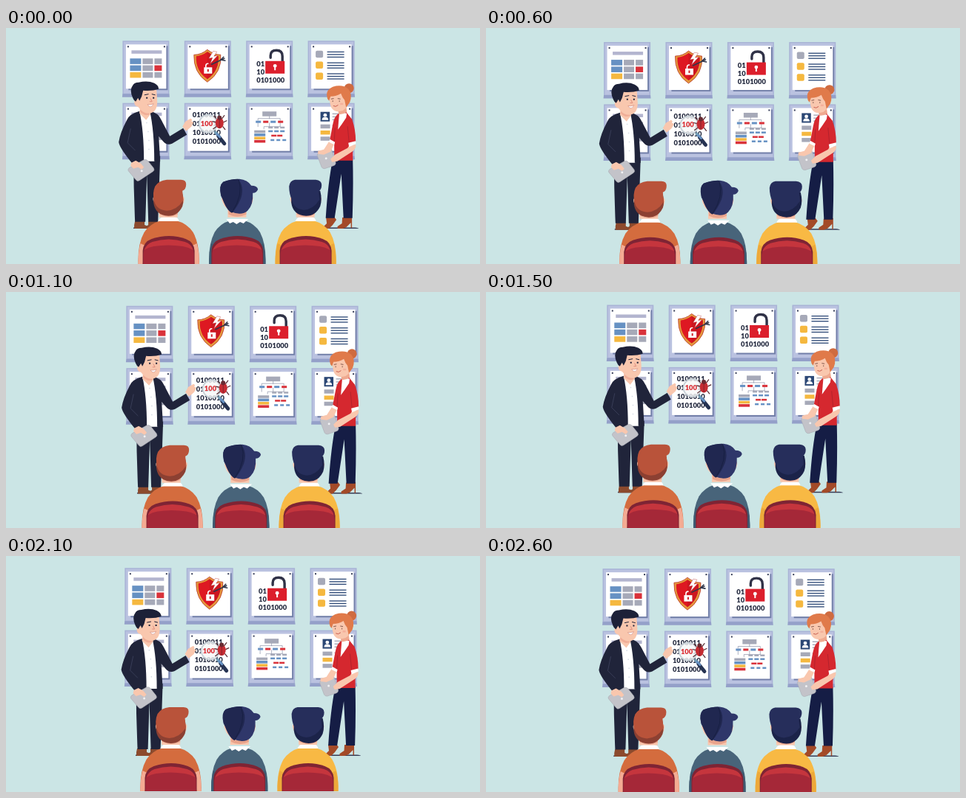
An HTML page for the animation above (2650 ms loop, 640 by 320 pixels).

```html
<!DOCTYPE html>
<html lang="en">
<head>
<meta charset="utf-8">
<title>Security training</title>
<style>
  html, body { margin: 0; width: 100%; height: 100%; overflow: hidden; background: #cbe5e5; }
  svg { display: block; width: 100%; height: 100%; }
  text { font: 900 9.4px Lato, "Open Sans", sans-serif; fill: #252b40; }
  .skin { fill: #f9c7ae; }
  .ink { fill: #20243a; }
  .line { fill: none; stroke-linecap: round; stroke-linejoin: round; }
</style>
</head>
<body>
<svg viewBox="0 0 640 320">
  <g class="base" id="boards"></g>

  <g class="base">
    <path fill="#343a55" d="M172 270.500H216q6 .5 6 1.500H172zM428 270.500H471q5 .5 5 1.500H428z"/>
    <path fill="#8c4a2d" d="M174 262h13v5l5 2v3h-19v-5zM192 262h12v5l4 2v3h-19v-3l3-2z"/>
    <path fill="#a34a28" d="M432 257l11-1 3 4-5 7-5 5h-7v-3l4-4zM454 257l13-1v15h-1.500v-7l-6 6-5 2h-7v-3l6-4z"/>
  </g>

  <!-- presenter, left -->
  <g class="top">
    <path class="ink" d="M172 174h36l-3 89h-13l-2-64-2 64h-14q-2-45-2-89z"/>
    <path fill="#fff" d="M179 112h16q5 30 6 69h-16z"/>
    <path class="ink" d="M180 113Q166 117 163 125Q154 142 152 155Q153 163 172 186L179 181L171 165L172 181H186Q186 140 180 113zM194 113Q205 115 209 124L221 147L239 136L244 145L224 157Q217 160 212 154L206 147L208 181H200Q200 140 194 113z"/>
    <path class="line" stroke="#383d57" d="M168 137l-4 19 10 10"/>
    <path fill="#d5dce6" d="M189 128h1.500v1.500H189zM191 140h1.500v1.500H191zM192 152h1.500v1.500H192zM192 164h1.500v1.500H192z"/>
    <path class="skin" d="M181 107l13 3 1 7-6 8-9-9zM238 134l4-7 7-4q3 1 1 4l3 1-3 6-7 6z"/>
    <path fill="#f0ae98" d="M181 109q7 7 13 5v3q-6 4-13-3z"/>
    <path class="skin" d="M178 84h25l1 16q0 14-10 16-9 1-16-9-5-1-5-6 0-5 5-5z"/>
    <path fill="#1d2138" d="M171 95q-5-11 0-17 2-4 8-4 12-3 21 1 6 3 6 8-9 3-21 2l-2 8-3 6-2-4-3 5q-3-2-4-5z"/>
    <path class="line" stroke="#1d2138" d="M187 91l5-1M197 90l4 1"/>
    <path fill="#1d2138" d="M189 94h2v2h-2zM198 94h2v2h-2z"/>
    <path class="line" stroke="#df8f7e" d="M195 96l2 4h-3"/>
    <path fill="#fff" stroke="#c4746a" stroke-width=".5" d="M191 104q4 1 8-1-2 5-5 4-2-1-3-3z"/>
    <path fill="#c3c3c9" stroke="#a8a9b2" stroke-width=".6" d="M166 190l20-11q3-1 5 1l8 10q2 3-1 5l-18 12q-3 2-5-1l-10-12q-1-2 1-4z"/>
    <circle cx="183" cy="194" r="1.500" fill="#f1f1f3"/>
    <path class="skin" d="M169 183l6-3 7 4 4 5-3 3-5-3-6 2-4-4z"/>
  </g>

  <!-- presenter, right -->
  <g class="top">
    <path fill="#151d45" d="M441 178h27q1 40-.5 80h-12l-3-60-9 60h-12q3-48 9.500-80z"/>
    <path class="skin" d="M449 106h10l1 11-7 10-4-10z"/>
    <path fill="#d5282f" d="M449 116Q443 120 441 131L437 152L443 156L443 180H468V160L472 154Q472 138 467 124Q462 118 459 114z"/>
    <path class="line" stroke="#b3222c" d="M461 134l2 21M444 136l-1 18"/>
    <path fill="#fff" d="M450 114l10 2-1 6-6 9-5 7 1-13z"/>
    <path fill="#efa98f" d="M448 111q6 1 11-4l1 7q-5 4-11 3z"/>
    <path class="skin" d="M437 89l22-3 2 15q-1 11-10 12-8 2-12-5-3-7-2-19z"/>
    <circle cx="463" cy="82" r="6.500" fill="#cf6b40"/>
    <path fill="#e07a4a" d="M433 92q-1-8 8-12 13-4 21 3 6 7 2 18l-5 7-2-10q-3-3-5-9-6 4-14 4l-2 6q-3-3-3-7z"/>
    <path class="line" stroke="#643b34" stroke-width=".8" d="M439 96.500l3-.5M448 96l3 .5M441 99v1M450 99v1"/>
    <path class="line" stroke="#c85e51" d="M442 106q3 2 6-1"/>
    <path fill="#f4b09b" d="M451 102h4v2.500h-4z"/>
    <path fill="#c3c3c9" stroke="#a8a9b2" stroke-width=".6" d="M422 169l13-6q3-1 4 1l6 19q0 3-3 4l-12 4q-3 0-4-2l-6-16q0-2 2-4z"/>
    <circle cx="432" cy="177" r="1.500" fill="#f1f1f3"/>
    <path class="skin" d="M436 154l7 3-5 11-9 4-8-1v-4l8-2zM463 160l9-2q1 6-5 10l-20 13-7 1-2-4 6-6 17-9z"/>
    <path fill="#fff" d="M437 151l7 4-1 3.500-7-3.500zM462 156l10-2.500v4l-9 4z"/>
  </g>

  <!-- audience -->
  <g class="base" id="bodies"></g>
  <g class="top">
    <g id="necks"></g>
    <path fill="#8c4032" d="M199 225l38-4q4 12 1 21-6 13-19 13-18-1-20-18z"/>
    <path fill="#b9533a" d="M200 235q-3-11 1-20 5-8 16-9h19q7 0 7 6 0 7-5 9l1 13q-8 13-22 14-14-1-17-13z"/>
    <path fill="#2f376a" d="M290 228q-3-14 3-19 10-4 22-4 11 1 16 9 8 0 9 5-2 5-7 5 1 16-7 24-4 4-11 4-12-1-15-7z"/>
    <path fill="#202750" d="M290 226q-3-12 3-17 10-4 20-4 9 10 4 26-5 12-12 20-8-3-15-25z"/>
    <path class="line" stroke="#171f43" d="M314 206q7 20-9 44"/>
    <path fill="#1b2349" d="M385 225l39-4q3 12 0 21-6 13-19 13-18-1-20-18z"/>
    <path fill="#262e5b" d="M386 234q-4-9-4-19 1-8 8-9h28q8 1 8 7 0 6-4 9l1 11q-8 13-21 14-13-1-16-13z"/>
  </g>
  <g class="base" id="seats"></g>
</svg>

<script>
const LOOP = 2650, STEP = 50, TAU = 2 * Math.PI;
const id = name => document.getElementById(name);
const rect = (x, y, w, h, fill) => `<rect x="${x}" y="${y}" width="${w}" height="${h}" fill="${fill}"/>`;
const path = (d, fill, more = '') => `<path d="${d}" fill="${fill}" ${more}/>`;
const stroke = (d, color, w) => path(d, 'none', `stroke="${color}" stroke-width="${w}" stroke-linecap="round"`);
const label = (x, y, s) => `<text x="${x}" y="${y}">${s}</text>`;

const BLUE = '#6691c3', GREY = '#a6a9b8', GOLD = '#f5b83f', RED = '#d9323a', NAVY = '#2b4775';

// Poster artwork; the origin is the top left corner of its board.
function calendar() {
  const fills = [BLUE, GREY, GREY, BLUE, GREY, RED, GOLD, GREY, GREY];
  const cols = [[10, 15], [27, 14], [43, 10]];
  return rect(12, 13, 41, 4.5, '#b3b5cf') + fills.map((fill, i) => {
    const [x, w] = cols[i % 3];
    return rect(x, 24 + 9.3 * Math.floor(i / 3), w, 7.6, fill);
  }).join('');
}

function shield() {
  const edge = 'M31 12q9 7 18 7 2 24-18 37-19-13-18-37 10 0 18-7z';
  return path(edge, '#e49a3c', 'stroke="#b8352d" stroke-width=".8"') +
    path('M31 15q7 5 15 6 1 20-15 31-16-11-15-31 8-1 15-6z', '#de1822') +
    path('M31 15q7 5 15 6 1 20-15 31z', '#cc1620') +
    rect(26.5, 36, 11, 8.5, '#fff') + stroke('M29 36v-2q0-3 3-3', '#fff', 1.6) +
    rect(31, 38.5, 2, 3.5, '#cf242b') +
    path('M39 14l-6 10 5-1-3 8 10-11-5 1 4-6z', '#fff', 'stroke="#b33236" stroke-width=".4"') +
    stroke('M37 32L54 24', '#30364a', 1.6) + stroke('M49 26l4-4M50 26l5 1', '#30364a', 1.6);
}

function openLock() {
  return label(14, 35, '01') + label(14, 46, '10') + label(14, 57, '0101000') +
    stroke('M33 23v-3q0-7 8-7 8 0 8 8v8', '#303247', 3.4) +
    rect(26, 27.5, 26, 17, '#dc1f2c') +
    `<circle cx="39" cy="34" r="2.400" fill="#fff"/>` + rect(38, 35, 2, 5, '#fff');
}

function list(fills, dark) {
  return fills.map((fill, i) => {
    const y = 13.5 + i * 14.8;
    return `<rect x="10.500" y="${y}" width="10" height="9.500" rx="2" fill="${fill}"/>` +
      [1, 4.5, 8].map(d => rect(26, y + d, 23, 1.3, dark)).join('');
  }).join('');
}

function bugHunt() {
  const rows = ['0100011', '0110010', '1010010', '0101000'];
  return rows.map((s, i) => label(11, 19.5 + i * 12, s)).join('') +
    stroke('M42 40l4 4', '#769fb4', 4) + stroke('M46 45l8 10', '#263352', 5) + stroke('M44 42l4 4', BLUE, 3) +
    `<circle cx="32" cy="28" r="12" fill="#f6f7f8" fill-opacity=".8" stroke="#c9d2d8" stroke-width="2"/>` +
    `<text x="22" y="31" style="fill:#e23238">100</text>` +
    stroke('M43 21l-3-3M51 21l3-4M42 26l-4-1M53 26l4-2M43 32l-4 3M52 32l3 4', '#54282f', 1.2) +
    `<ellipse cx="47.500" cy="27" rx="5.500" ry="7.500" fill="#c52b32"/>` +
    `<circle cx="47.500" cy="20" r="3" fill="#682b32"/>` + stroke('M47.500 21v13', '#7f222c', .9);
}

function chart() {
  let out = rect(22, 11.5, 19, 6.5, GREY) +
    stroke('M31.500 18v3M16 23.500v-2.500H46v2.500M16 27v5M31.500 27v5M46 27v5M24 35v-3H46', '#777f99', .6);
  for (const [i, x] of [13, 23, 33, 43].entries()) out += rect(x, 24, 7, 3, i % 2 ? RED : BLUE);
  for (const x of [30, 38, 46]) out += rect(x, 32, 6, 2.5, GREY) + rect(x, 37, 6, 2.5, BLUE);
  for (const x of [34, 42]) out += rect(x, 43, 7, 2.5, RED);
  for (const x of [33, 41, 49]) out += rect(x, 49, 5, 2.5, BLUE);
  [GREY, BLUE, GOLD, RED].forEach((fill, i) => out += rect(11, 37 + i * 4.4, 15, 3.6, fill));
  return out;
}

function profile() {
  return rect(17, 12, 12.5, 13, NAVY) + path('M19 23q0-4 4.300-4t4.300 4z', '#fff') +
    `<circle cx="23.300" cy="16.500" r="2.400" fill="#fff"/>` +
    [GREY, GOLD, GREY].map((fill, i) => rect(17, 29 + i * 8.3, 13, 5.5, fill)).join('') +
    [14, 18, 22, 30, 38, 46].map(y => rect(33, y, 12, 1.4, GREY)).join('');
}

function board(art, i) {
  const x = 157.3 + 83.4 * (i % 4), y = 17.2 + 84.4 * Math.floor(i / 4);
  return `<g transform="translate(${x} ${y})">` +
    rect(0, 0, 63, 73, '#a9b3d6') + rect(1.5, 1.5, 60, 70, '#bac2e0') +
    path('M0 72H63l.5 4.500H-.5z', '#94a0c9') +
    path('M6 7h55v60H8z', '#727fa9') + rect(4.5, 5, 54.5, 60, '#fff') +
    rect(6.5, 7, 2, 2, '#343b56') + rect(55.5, 7, 2, 2, '#343b56') + art + '</g>';
}

const posters = [
  calendar(), shield(), openLock(), list([GREY, GOLD, GOLD], NAVY),
  calendar(), bugHunt(), chart(), profile()
];
id('boards').innerHTML = posters.map(board).join('');

// Seated viewers: centre, clothing, colour of the arms, build
const viewers = [
  [219.5, '#d46c3e', '#f4ab93', 1],
  [312.2, '#48647a', '#3e5a71', .93],
  [404.5, '#f8b944', '#eda93a', 1]
];
const shift = (x, art, wide = 1) => `<g transform="translate(${x} 0) scale(${wide} 1)">${art}</g>`;

id('bodies').innerHTML = viewers.map(([x, fill, arm, wide], i) => shift(x,
  path('M-41 320Q-42 293-33 277Q-25 265-10 261H10Q25 265 33 277Q42 293 41 320z', fill) +
  path('M-41 320q-.5-15 3-28l6 3-3 25zM41 320q.5-15-3-28l-6 3 3 25z', arm) +
  path(i === 1 ? 'M-16 259l5 6 5-2 5 3 5-3 5 2 7-6z' : 'M-14 262q2-5 7-6h15q5 1 6 6z', '#fff'), wide)).join('');

id('necks').innerHTML = viewers.map(([x]) => shift(x,
  '<path class="skin" d="M-19 229q-3 0-2 5l3 7 5 5V257H12V247l6-6q4-5 3-11-2-3-5-1z"/>' +
  path('M-12 248q12 7 24 0v5q-12 6-24 0z', '#e9a48c'))).join('');

id('seats').innerHTML = viewers.map(([x]) => shift(x,
  path('M-35 320v-18q1-12 12-16 24-8 46 0 11 4 12 16v18z', '#7e2434') +
  path('M-34 320v-14q1-12 12-15 22-7 44 0 11 3 12 15v14z', '#a52838') +
  path('M-33 301q3-8 11-11 22-7 44 0 9 3 11 11-7-4-14-5-20-3-39 0-7 1-13 5z', '#c5353d'))).join('');

// Slow elliptical drift; the upper figures trail slightly behind.
const layers = [['.base', 115, 0], ['.top', 235, -.25]]
  .map(([sel, lag, dx]) => ({ nodes: document.querySelectorAll(sel), lag, dx }));

function draw(now) {
  const t = Math.floor(now % LOOP / STEP) * STEP;
  for (const { nodes, lag, dx } of layers) {
    const a = TAU * (t - lag) / LOOP;
    const x = 3 - 3 * Math.cos(a) + dx, y = .5 + 1.5 * Math.sin(a);
    nodes.forEach(n => n.setAttribute('transform', `translate(${x.toFixed(2)} ${y.toFixed(2)})`));
  }
}

let start;
function tick(now) {
  start ??= now;
  draw(now - start);
  requestAnimationFrame(tick);
}
draw(0);
requestAnimationFrame(tick);
</script>
</body>
</html>
```
